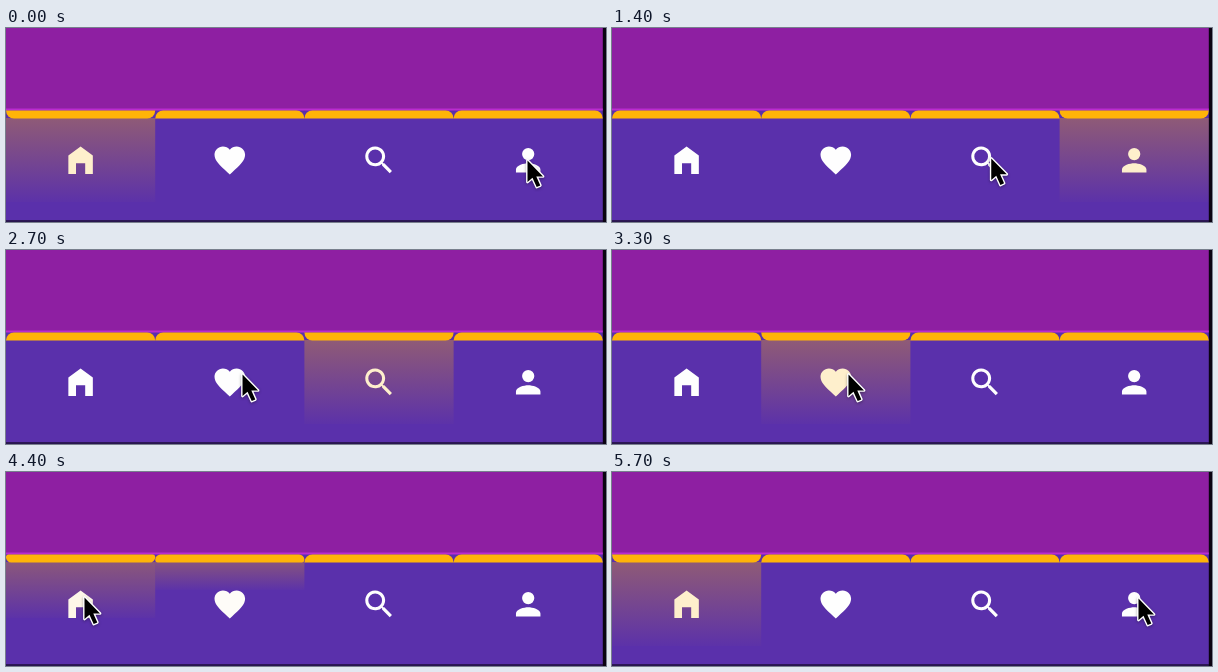
An HTML page with a canvas that plays this animation: 600 px wide and 194 px high, repeating every 5.8 s.

```html
<!DOCTYPE html>
<html lang="en">
<head>
<meta charset="utf-8">
<title>Tab bar</title>
<style>
html, body { margin: 0; width: 100%; height: 100%; overflow: hidden; background: #0a0312; }
canvas { display: block; width: 600px; height: 194px; }
</style>
</head>
<body>
<canvas id="stage"></canvas>
<script>
const LOOP = 5800, STEP = 100, FADE = 300;
const TAB_W = 149.2, WIDTH = TAB_W * 4;
const BAR_TOP = 82.5, BAR_H = 8, GLOW_TOP = 90, GLOW_H = 84;
const PURPLE = '#8e1fa2', VIOLET = '#5a30ab', AMBER = '#ffb408', CREAM = [254, 239, 204];

const canvas = document.getElementById('stage');
const ctx = canvas.getContext('2d');
const ratio = window.devicePixelRatio || 1;
canvas.width = 600 * ratio;
canvas.height = 194 * ratio;

const mix = (a, b, p) => a + (b - a) * p;
const clamp = v => Math.max(0, Math.min(1, v));
const easeOut = u => 1 - (1 - u) ** 6;

// The pointer rests at each stop, clicks the tab there and leaves
const stops = [
  { tab: 3, x: 520.5, y: 130, click: 400, leave: 1050 },
  { tab: 2, x: 377.5, y: 128, click: 1765, leave: 2250 },
  { tab: 1, x: 235.5, y: 122, click: 2950, leave: 3450 },
  { tab: 0, x: 77.5, y: 123, click: 4200, leave: 4500 }
];
const home = stops[3];
const exit = { x: 525.5, y: 124 };

function pointerAt(t) {
  const i = stops.findLastIndex(s => t >= s.leave);
  if (i < 0) return stops[0];
  const from = stops[i], to = stops[i + 1] || exit;
  const travel = from === home ? LOOP - from.leave : 600;
  const s = easeOut(clamp((t - from.leave) / travel));
  const lift = Math.abs(to.x - from.x) * 0.035 * Math.sin(Math.PI * s);
  return { x: mix(from.x, to.x, s), y: mix(from.y, to.y, s) - lift };
}

function levelsAt(t) {
  const levels = [0, 0, 0, 0];
  const i = stops.findLastIndex(s => t >= s.click);
  if (i < 0) {
    levels[home.tab] = 1;
    return levels;
  }
  const p = clamp((t - stops[i].click) / FADE);
  levels[(stops[i - 1] || home).tab] = 1 - p;
  levels[stops[i].tab] = p;
  return levels;
}

// Icons on a 24 unit grid, in tab order
const icons = [
  'M12 3L20 9V21H15V14H9V21H4V9Z',
  'M12 21.35l-1.45-1.32C5.4 15.36 2 12.28 2 8.5 2 5.42 4.42 3 7.5 3c1.74 0 3.41.81 4.5 2.09C13.09 3.81 14.76 3 16.5 3 19.58 3 22 5.42 22 8.5c0 3.78-3.4 6.86-8.55 11.54Z',
  'M15.5 14h-.79l-.28-.27A6.5 6.5 0 1 0 13.73 14.43l.27.28v.79l5 4.99L20.49 19ZM9.5 14A4.5 4.5 0 1 1 9.5 5a4.5 4.5 0 0 1 0 9Z',
  'M12 12a4 4 0 1 0 0-8a4 4 0 0 0 0 8ZM12 14c-2.67 0-8 1.34-8 4v2h16v-2c0-2.66-5.33-4-8-4Z'
].map(d => new Path2D(d));
const arrow = new Path2D('M1 2.5V24L6 19.8L10.2 29L13.8 27.4L9.8 18.4H16.5Z');

function rect(color, x, y, w, h) {
  ctx.fillStyle = color;
  ctx.fillRect(x, y, w, h);
}

function drawGlow(x, p) {
  const h = GLOW_H * p;
  const glow = ctx.createLinearGradient(0, GLOW_TOP, 0, GLOW_TOP + h);
  glow.addColorStop(0, `rgba(255,180,8,${mix(0.24, 0.32, p)})`);
  glow.addColorStop(1, 'rgba(255,180,8,0.015)');
  rect(glow, x, GLOW_TOP, TAB_W, h);
}

function drawBar(x, p) {
  const up = BAR_H * (1 - p), down = BAR_H * p;
  ctx.fillStyle = AMBER;
  ctx.beginPath();
  ctx.roundRect(x, BAR_TOP, TAB_W, BAR_H, [up, up, down, down]);
  ctx.fill();
}

function drawIcon(icon, x, p) {
  ctx.save();
  ctx.translate(x, 132.2);
  ctx.scale(1.53, 1.53);
  ctx.translate(-12, -12);
  ctx.fillStyle = `rgb(${CREAM.map(c => mix(254, c, p * p))})`;
  ctx.fill(icon, 'evenodd');
  ctx.restore();
}

function drawTab(i, p) {
  const x = i * TAB_W;
  if (p > 0) drawGlow(x, p);
  drawBar(x, p);
  drawIcon(icons[i], x + TAB_W / 2, p);
}

function drawPointer({ x, y }) {
  ctx.save();
  ctx.translate(x, y);
  ctx.lineWidth = 2.8;
  ctx.lineJoin = 'round';
  ctx.strokeStyle = '#fff';
  ctx.shadowColor = 'rgba(0,0,0,0.35)';
  ctx.shadowBlur = 3 * ratio;
  ctx.shadowOffsetY = ratio;
  ctx.stroke(arrow);
  ctx.shadowColor = 'transparent';
  ctx.fillStyle = '#000';
  ctx.fill(arrow);
  ctx.restore();
}

function draw(t) {
  ctx.setTransform(ratio, 0, 0, ratio, 0, 0);
  rect('#0a0312', 0, 0, 600, 194);
  rect(PURPLE, 0, 0, WIDTH, 81);
  rect(VIOLET, 0, 81, WIDTH, 111.5);
  rect('#ba2cd0', 0, 80.5, WIDTH, 2);
  rect('#29164f', 0, 192.5, WIDTH, 1.5);
  levelsAt(t).forEach((p, i) => drawTab(i, p));
  drawPointer(pointerAt(t));
}

const start = performance.now();
function tick() {
  const t = (performance.now() - start) % LOOP;
  draw(Math.floor(t / STEP) * STEP);
  requestAnimationFrame(tick);
}
tick();
</script>
</body>
</html>
```
